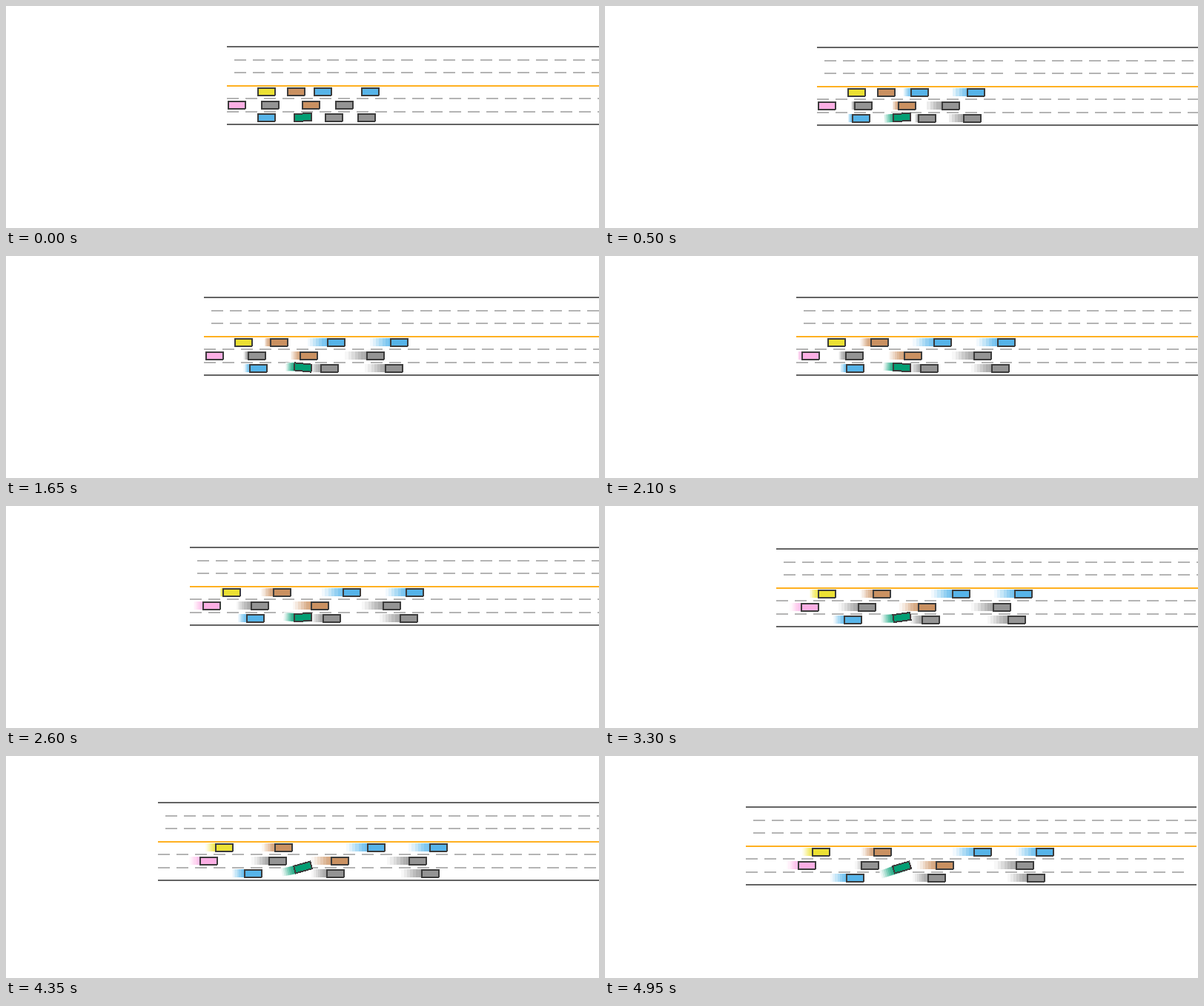
An HTML page with a canvas for the animation above (5 s loop, 800 px wide and 300 px high).

```html
<!DOCTYPE html>
<html lang="en">
<head>
<meta charset="utf-8">
<title>Highway traffic</title>
<style>
  html, body { margin: 0; width: 100%; height: 100%; overflow: hidden; background: #fff; }
  canvas { display: block; }
</style>
</head>
<body>
<canvas id="stage" width="800" height="300"></canvas>
<script>
const ctx = document.getElementById('stage').getContext('2d');
const LOOP = 5, STEP = 0.05;
const ROAD_LENGTH = 608, CAR_W = 25, CAR_H = 12;
const GHOSTS = 7, GHOST_GAP = 0.1;
const BLUE = '#56b4e9', BROWN = '#ca9161', GRAY = '#949494',
      YELLOW = '#ece133', PINK = '#fbafe4', GREEN = '#029e73',
      OUTLINE = '#3c3c3c', EDGE = '#646464', DASH = '#b4b4b4', CENTRE = '#ffb020';

// Zero before t = 0, then rising at one unit per second, with a soft bend
const BEND = 0.2;
const ramp = t => BEND * Math.log(1 + Math.exp(t / BEND));

// A steady speed, softly changed by the given amount at each [time, change]
const motion = (start, speed, ...changes) => t =>
  changes.reduce((x, [at, change]) => x + change * ramp(t - at), start + speed * t);

// The camera follows the green car, which brakes, speeds up and swerves left
const travelled = motion(0, 30.5, [0.45, -19.5], [1.25, 9], [2.68, 5]);
const roadX = t => 298.6 - travelled(t);
const roadY = motion(0.5, 2.1, [1, -3.6], [1.7, 1.5], [2.8, 3.3], [4.1, 7]);
const heading = motion(-4, 0, [0.9, 18], [1.65, -28.5], [4.1, 10.5]);

const LANES = [110, 128, 145];
const car = (lane, color, ...drive) => ({ y: LANES[lane], color, x: motion(...drive) });
const cars = [
  car(0, YELLOW, 41, 0, [2.6, 20.5]),
  car(0, BROWN, 81, 0, [1.38, 25.5]),
  car(0, BLUE, 116, 18, [0.87, 25]),
  car(0, BLUE, 181, 42.4),
  car(1, PINK, 1, 0, [1.9, 22.5]),
  car(1, GRAY, 46, 7, [2.07, 33], [4.55, -50]),
  car(1, BROWN, 101, 15, [1.65, 24.5]),
  car(1, GRAY, 146, 44),
  car(2, BLUE, 41, 12, [2.3, 10], [4.3, 12]),
  car(2, GRAY, 131, 10, [0.95, 13], [3.4, 8]),
  car(2, GRAY, 176, 41)
];

function rect(color, x, y, w, h) {
  ctx.fillStyle = color;
  ctx.fillRect(x, y, w, h);
}

function dashes(x, y, count) {
  for (let i = 0; i < count; i++) rect(DASH, x + i * 25, y, 16, 2);
}

function drawRoad(x, y) {
  rect(EDGE, x, y + 54, ROAD_LENGTH, 2);
  for (const row of [72, 89]) {
    dashes(x + 10, y + row, 10);
    dashes(x + 267, y + row, 14);
  }
  rect(CENTRE, x, y + 107, ROAD_LENGTH, 2);
  for (const row of [124, 142]) dashes(x, y + row, 24);
  rect(EDGE, x, y + 159, ROAD_LENGTH, 2);
}

// Calls draw for each past moment, oldest and faintest first
function trail(t, draw) {
  for (let k = GHOSTS; k > 0; k--) {
    const past = t - (k - 0.5) * GHOST_GAP;
    if (past >= 0) draw(past, 0.43 - 0.05 * k);
  }
}

function drawCar({ x, y, color }, t, camX, camY) {
  const left = past => Math.floor(x(past) + camX);
  const now = left(t), top = y + camY;
  trail(t, (past, alpha) => {
    ctx.globalAlpha = alpha;
    rect(color, left(past), top, CAR_W, CAR_H - 1);
  });
  ctx.globalAlpha = 1;
  rect(OUTLINE, now, top, CAR_W, CAR_H - 1);
  rect(OUTLINE, now, top + CAR_H - 1, CAR_W - 1, 1);
  rect(color, now + 2, top + 2, CAR_W - 4, CAR_H - 4);
}

const radians = t => heading(t) * Math.PI / 180;

function atGhost(t, past, draw) {
  ctx.save();
  ctx.translate(400.5 + roadX(t) - roadX(past), 150.5 + roadY(t) - roadY(past));
  draw();
  ctx.restore();
}

// The turning car's trail hides the lane markings in its bounding boxes
function drawEgoTrail(t) {
  trail(t, past => atGhost(t, past, () => {
    const c = Math.cos(radians(past)), s = Math.abs(Math.sin(radians(past)));
    const w = CAR_W * c + CAR_H * s, h = CAR_W * s + CAR_H * c;
    rect('#fff', -w / 2, -h / 2, w, h);
  }));
  trail(t, (past, alpha) => atGhost(t, past, () => {
    ctx.globalAlpha = alpha;
    ctx.rotate(radians(past));
    rect(GREEN, -CAR_W / 2, -5.5, CAR_W, 11);
  }));
}

// Hard-edged rotated car, sampled pixel by pixel
function drawEgo(t) {
  const c = Math.cos(radians(t)), s = Math.sin(radians(t));
  for (let dy = -12; dy <= 12; dy++) {
    for (let dx = -15; dx <= 15; dx++) {
      const u = Math.abs(dx * c + dy * s), v = Math.abs(dy * c - dx * s);
      if (u > CAR_W / 2 || v > CAR_H / 2) continue;
      const inside = u < CAR_W / 2 - 2 && v < CAR_H / 2 - 2;
      rect(inside ? GREEN : OUTLINE, 400 + dx, 150 + dy, 1, 1);
    }
  }
}

function render(t) {
  const camX = roadX(t), camY = Math.floor(roadY(t));
  rect('#fff', 0, 0, 800, 300);
  drawRoad(Math.floor(camX), camY);
  drawEgoTrail(t);
  for (const each of cars) drawCar(each, t, camX, camY);
  drawEgo(t);
}

const start = performance.now();
function tick() {
  const elapsed = (performance.now() - start) / 1000 % LOOP;
  render(Math.floor(elapsed / STEP) * STEP);
  requestAnimationFrame(tick);
}
tick();
</script>
</body>
</html>
```
